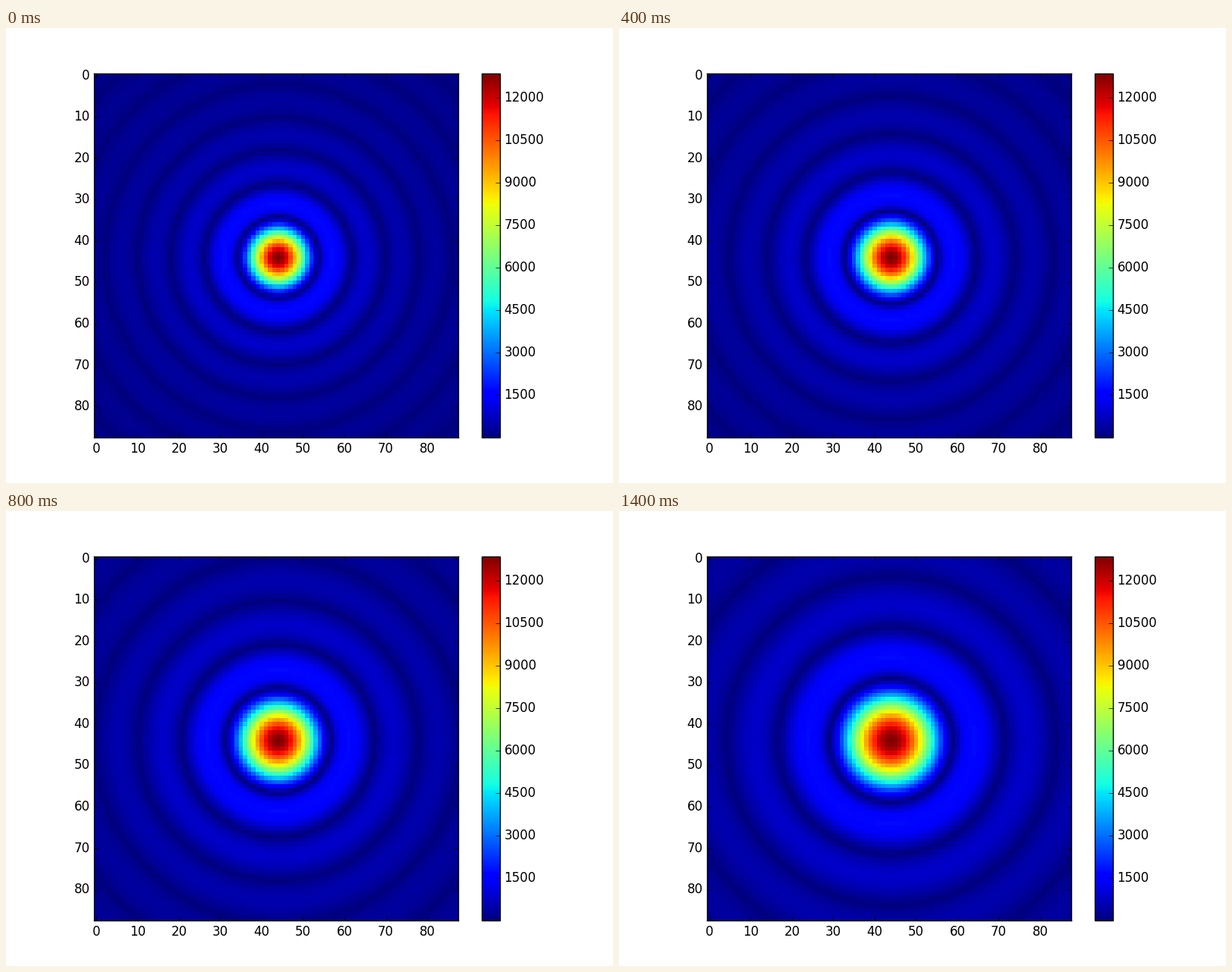
Animation, 800 px wide and 600 px high, one loop 1500 ms. Source, as a matplotlib script:

```python
import numpy as np
import matplotlib.pyplot as plt
from matplotlib.animation import FuncAnimation

plt.style.use("classic")
plt.rcParams.update({
    "font.family": "DejaVu Sans",
    "font.size": 12,
    "figure.facecolor": "white",
    "savefig.facecolor": "white",
    "figure.dpi": 100,
    "savefig.dpi": 100,
})

WIDTH, HEIGHT = 800, 600
FRAMES, INTERVAL = 15, 100
SIZE = 88          # samples along each side of the image
RADIUS = 64        # radius of the round aperture
BASE = 1024        # transform length at the shortest wavelength
GROWTH = 0.0383    # relative wavelength step per frame

x = np.arange(-RADIUS, RADIUS + 1)
u = np.arange(SIZE) - SIZE // 2
aperture = (x[:, None] ** 2 + x ** 2 <= RADIUS ** 2).astype(float)
peak = aperture.sum()


def diffraction(i):
    """Amplitude of the Fourier transform of the aperture."""
    length = BASE * (1 + GROWTH * i)
    kernel = np.cos(2 * np.pi * np.outer(u, x) / length)
    return np.abs(kernel @ aperture @ kernel.T)


def pixel_axes(left, bottom, width, height):
    return fig.add_axes([left / WIDTH, bottom / HEIGHT,
                         width / WIDTH, height / HEIGHT])


fig = plt.figure(figsize=(WIDTH / 100, HEIGHT / 100), dpi=100)
ax = pixel_axes(116, 60, 480, 480)
cax = pixel_axes(627, 60, 24, 480)

image = ax.imshow(diffraction(0), cmap="jet", vmin=0, vmax=peak,
                  interpolation="nearest")
ax.set_xticks(range(0, SIZE, 10))
ax.set_yticks(range(0, SIZE, 10))

bar = fig.colorbar(image, cax=cax, ticks=range(1500, 12001, 1500))
bar.minorticks_off()
cax.tick_params(left=False, right=True)


def update(i):
    image.set_data(diffraction(i))
    return [image]


anim = FuncAnimation(fig, update, frames=FRAMES, interval=INTERVAL,
                     repeat=True, repeat_delay=0)
plt.show()
```
